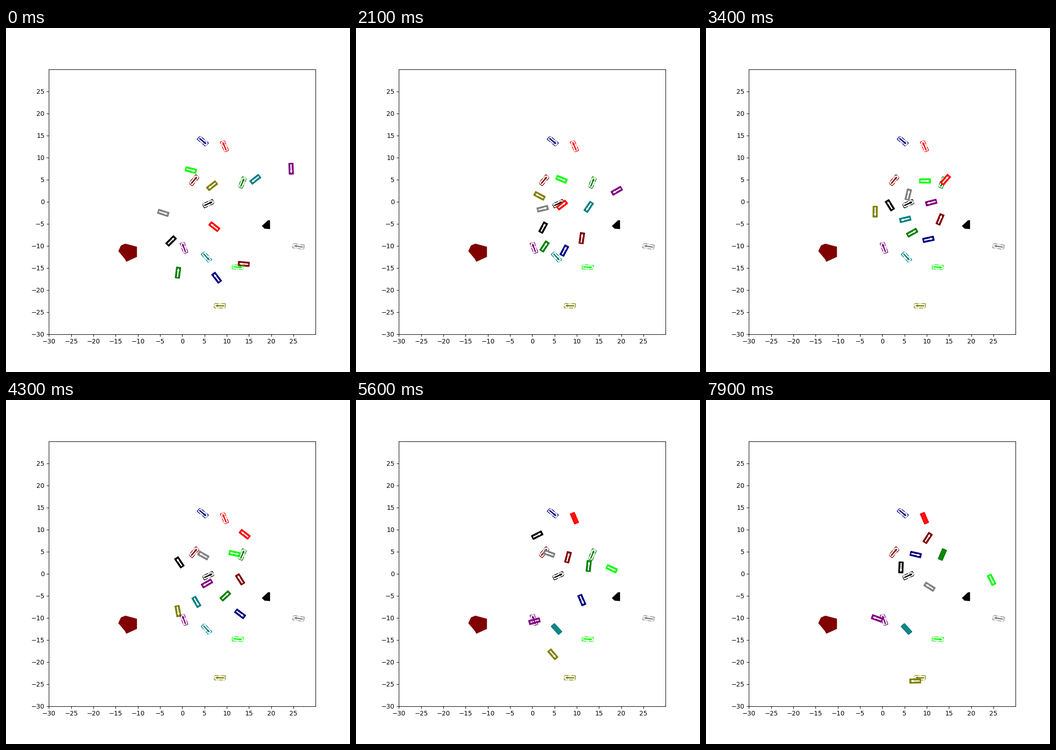
Write a matplotlib script that moves like this. It is 748 px wide and 748 px high and loops after 8 s.

```python
import numpy as np
import matplotlib.pyplot as plt
from matplotlib.animation import FuncAnimation
from matplotlib.patches import Polygon

SIZE, DPI = 748, 100
FRAMES, STEP = 80, 100
LENGTH, WIDTH = 2.5, 1.0
TIMES = [1, 21, 43, 56, 79]  # frames at which the key poses are reached

# Goal, then key poses: stage pixels and heading in degrees.
# A car with fewer poses than TIMES ends parked on its goal.
CARS = {
    "black": [(440, 382, 25), (359, 463, 45), (407, 434, 62),
              (377, 353, 124), (394, 294, 27), (424, 364, -92)],
    "maroon": [(409, 331, 50), (517, 513, 175), (491, 457, 82),
               (509, 390, 122), (461, 342, 75), (482, 300, 57)],
    "green": [(514, 336, 67), (374, 532, 83), (410, 475, 57),
              (477, 426, 43), (506, 361, 84)],
    "olive": [(465, 604, 179), (448, 343, 218), (399, 365, 152),
              (374, 459, 280), (428, 553, 310), (455, 611, 181)],
    "navy": [(428, 246, -40), (458, 543, 127), (453, 484, 62),
             (509, 465, -37), (491, 435, -67), (456, 336, -13)],
    "purple": [(387, 478, 110), (620, 306, 272), (567, 354, 210),
               (437, 399, 210), (388, 481, 195), (372, 475, 160)],
    "teal": [(436, 498, -48), (542, 329, 218), (506, 389, 236),
             (414, 439, 300)],
    "gray": [(636, 475, 171), (342, 402, -18), (406, 393, 14),
             (429, 338, 150), (420, 334, 160), (486, 406, 148)],
    "red": [(475, 257, 113), (453, 432, 142), (448, 385, 38),
            (519, 292, 142)],
    "lime": [(504, 520, -4), (402, 309, -14), (447, 329, -22),
             (497, 334, -12), (556, 367, -25), (621, 391, -63)],
}

OBSTACLES = {
    "black": [(17.9, -5.5), (19.3, -4.2), (19.75, -4.2),
              (19.75, -6.2), (18.5, -6.1)],
    "maroon": [(-14.4, -11.2), (-13.8, -9.9), (-12.8, -9.5), (-10.2, -10.2),
               (-10.2, -12.5), (-12.6, -13.6), (-12.9, -13.0)],
}

BOX = np.array([-1 - 1j, 1 - 1j, 1 + 1j, -1 + 1j])
BOX = BOX.real * LENGTH / 2 + 1j * BOX.imag * WIDTH / 2


def arrow(shaft=0.07, head=0.2, tail=-0.95, neck=0.45, tip=0.95):
    side = np.array([tail + shaft * 1j, neck + shaft * 1j, neck + head * 1j])
    return np.concatenate([side, [tip], side[::-1].conj()])


def pose_at(px, py, deg):
    """Stage pixels and degrees to a complex place and unit heading."""
    x = (px / SIZE - 0.125) / 0.775 * 60 - 30
    y = (0.89 - py / SIZE) / 0.77 * 60 - 30
    return x + 1j * y, np.exp(1j * np.radians(deg))


def outline(shape, place, heading):
    z = place + shape * heading
    return np.column_stack([z.real, z.imag])


def drive(start, end, u):
    """Roll from pose to pose along a smooth curve, backwards if shorter."""
    (a, ha), (b, hb) = start, end
    chord = b - a
    gear = 1 if (chord * np.conj(ha + hb)).real >= 0 else -1
    # This tangent length makes a symmetric turn a circular arc
    pull = gear * abs(chord) / np.cos(np.angle(hb / ha) / 4) ** 2
    ta, tb = ha * pull, hb * pull
    place = (a + chord * u * u * (3 - 2 * u)
             + ta * u * (1 - u) ** 2 - tb * u * u * (1 - u))
    slope = (6 * u * (1 - u) * chord + ta * (1 - u) * (1 - 3 * u)
             + tb * u * (3 * u - 2))
    return place, gear * slope / abs(slope)


def car_pose(stops, frame):
    t = np.clip(frame, TIMES[0], TIMES[len(stops) - 1])
    leg = min(np.searchsorted(TIMES, t, side="right"), len(stops) - 1)
    u = (t - TIMES[leg - 1]) / (TIMES[leg] - TIMES[leg - 1])
    if leg == 1:
        u = u ** 1.7  # all cars pull away from rest
    return drive(stops[leg - 1], stops[leg], u)


fig = plt.figure(figsize=(SIZE / DPI, SIZE / DPI), dpi=DPI)
ax = fig.add_axes([0.1249, 0.11, 0.7751, 0.77])
ax.set(xlim=(-30, 30), ylim=(-30, 30),
       xticks=range(-30, 30, 5), yticks=range(-30, 30, 5))


def add(points, **style):
    return ax.add_patch(Polygon(points, **style))


for color, points in OBSTACLES.items():
    add(points, color=color, lw=0)

ARROW = arrow()
fleet = []
for color, keys in CARS.items():
    goal, *stops = [pose_at(*key) for key in keys]
    if len(stops) < len(TIMES):
        stops.append(goal)
    body = add(outline(BOX, *stops[0]), color=color, lw=1)
    mark = add(outline(ARROW, *stops[0]), color="white", lw=1)
    fleet.append((stops, body, mark))
    add(outline(BOX, *goal), fill=False, ec=color, ls="-.", lw=1)
    add(outline(ARROW, *goal), color=color, lw=1)


def update(frame):
    for stops, body, mark in fleet:
        pose = car_pose(stops, frame)
        body.set_xy(outline(BOX, *pose))
        mark.set_xy(outline(ARROW, *pose))
    return [patch for _, *pair in fleet for patch in pair]


anim = FuncAnimation(fig, update, frames=FRAMES, interval=STEP,
                     repeat=True, repeat_delay=0)
plt.show()
```
